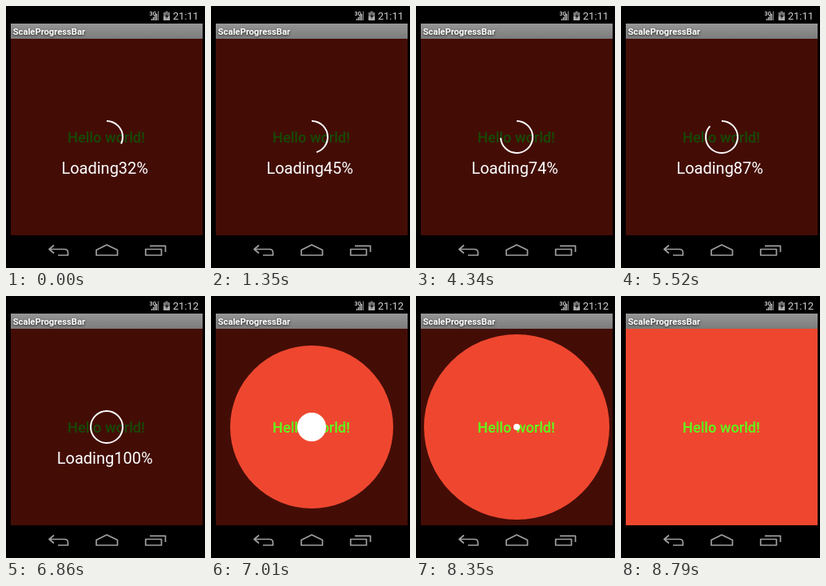
Recreate the animation shown at these times as an HTML page. Size 249 by 328 pixels, loop 9.39 s.

```html
<!DOCTYPE html>
<html lang="en">
<head>
<meta charset="utf-8">
<title>ScaleProgressBar</title>
<style>
  html, body { margin: 0; width: 100%; height: 100%; overflow: hidden; background: #000; }
  svg { display: block; width: 249px; height: 328px; font-family: Roboto, sans-serif; }
  .title { font-weight: 700; font-size: 11.2px; fill: #fff; text-shadow: 0 1px 3px #222; }
  .icon { fill: none; stroke: #a0a0a0; stroke-width: 1.7; stroke-linejoin: round; }
</style>
</head>
<body>
<svg viewBox="0 0 249 328">
  <defs>
    <linearGradient id="bar" x2="0" y2="1">
      <stop stop-color="#969696"/><stop offset="1" stop-color="#7c7c7c"/>
    </linearGradient>
    <clipPath id="app"><path d="M6 41H246V287H6z"/></clipPath>
  </defs>
  <rect width="249" height="328"/>

  <!-- status bar -->
  <text x="179.500" y="12" font-size="7" font-weight="700" fill="#ccc">3G</text>
  <path d="M182.500 18V16M184.500 18V14M186.500 18V12M188.500 18V10" stroke="#bbb" stroke-width="1.4"/>
  <path d="M190.500 18V6.500" stroke="#777" stroke-width="1.4"/>
  <path d="M199.500 6.500H202.500V8H205V18H197V8H199.500z" fill="#777"/>
  <path d="M197 13H205V18H197z" fill="#aaa"/>
  <path d="M202 9L199 13.500H201L200.300 16.500L203.500 12H201.300z" fill="#111"/>
  <text id="clock" x="208.700" y="17" font-size="13" fill="#d0d0d0"></text>

  <!-- title -->
  <rect x="6" y="22" width="240" height="19" fill="url(#bar)"/>
  <text class="title" x="8.700" y="36">ScaleProgressBar</text>

  <!-- content -->
  <g clip-path="url(#app)">
    <rect x="6" y="41" width="240" height="246" fill="#ef472f"/>
    <path id="shade" fill="#430d06" fill-rule="evenodd"/>
    <text id="hello" x="125.500" y="171" font-size="18.2" font-weight="500" text-anchor="middle">Hello world!</text>
    <circle id="ring" cx="126" cy="164" r="20" fill="none" stroke="#fff" stroke-width="2"
            pathLength="100" transform="rotate(-90 126 164)"/>
    <circle id="dot" cx="126" cy="164" fill="#fff"/>
    <text id="label" x="123.700" y="210" font-size="20" fill="#fff" text-anchor="middle"></text>
  </g>

  <!-- navigation -->
  <g class="icon">
    <path d="M60 299.500L54 304.500L60 309.500M54 304.500H73Q77.500 304.500 77.500 308.500V312H65"/>
    <path d="M113 312V305.500L126 299L139.500 305.500V312z"/>
    <path d="M174.700 304.500H194.500V312H174.700zM180 300.300H199.500V308"/>
  </g>
</svg>
<script>
const $ = id => document.getElementById(id);
const LOOP = 9390, FULL = 46, END = 59;
const HELD = [21, 51, 55, 58];                       // ticks the UI drops
const KEYS = [[0, 32], [7, 42], [14, 54], [18, 58], [20, 62], [29, 74], [37, 87], [45, 99], [46, 100]];

const tickTime = n => n <= 22 ? 150 * n : 3300 + Math.round((n - 22) * 14.83) * 10;

function tickAt(t) {
  let n = 0;
  while (n < END && tickTime(n + 1) <= t) n++;
  return HELD.includes(n) ? n - 1 : n;
}

function percentAt(n) {
  if (n >= FULL) return 100;
  const i = KEYS.findIndex(k => k[0] > n);
  const [a, p] = KEYS[i - 1], [b, q] = KEYS[i];
  return Math.floor(p + (q - p) * (n - a) / (b - a));
}

function show(el, on) { el.style.display = on ? "" : "none"; }

function draw(t) {
  const n = tickAt(t), percent = percentAt(n);
  const loading = n <= FULL, done = n >= END;
  const grow = loading ? 0 : 2 * (n - FULL - HELD.filter(h => h > FULL && h <= n).length);
  const r = 100 + grow;

  $("clock").textContent = t < 6260 ? "21:11" : "21:12";
  $("label").textContent = `Loading${percent}%`;
  $("hello").setAttribute("fill", loading ? "#164a06" : "#5cff1c");
  $("ring").setAttribute("stroke-dasharray", percent < 100 ? `${percent} 100` : "none");
  $("dot").setAttribute("r", Math.max(0, 20 - grow));
  const hole = loading ? "" : `M${126 - r} 164a${r} ${r} 0 1 0 ${2 * r} 0a${r} ${r} 0 1 0 ${-2 * r} 0z`;
  $("shade").setAttribute("d", "M6 41H246V287H6z" + hole);

  show($("label"), loading);
  show($("ring"), loading);
  show($("dot"), !loading && !done);
  show($("shade"), !done);
}

const start = performance.now();
function frame() {
  draw((performance.now() - start) % LOOP);
  requestAnimationFrame(frame);
}
frame();
</script>
</body>
</html>
```
